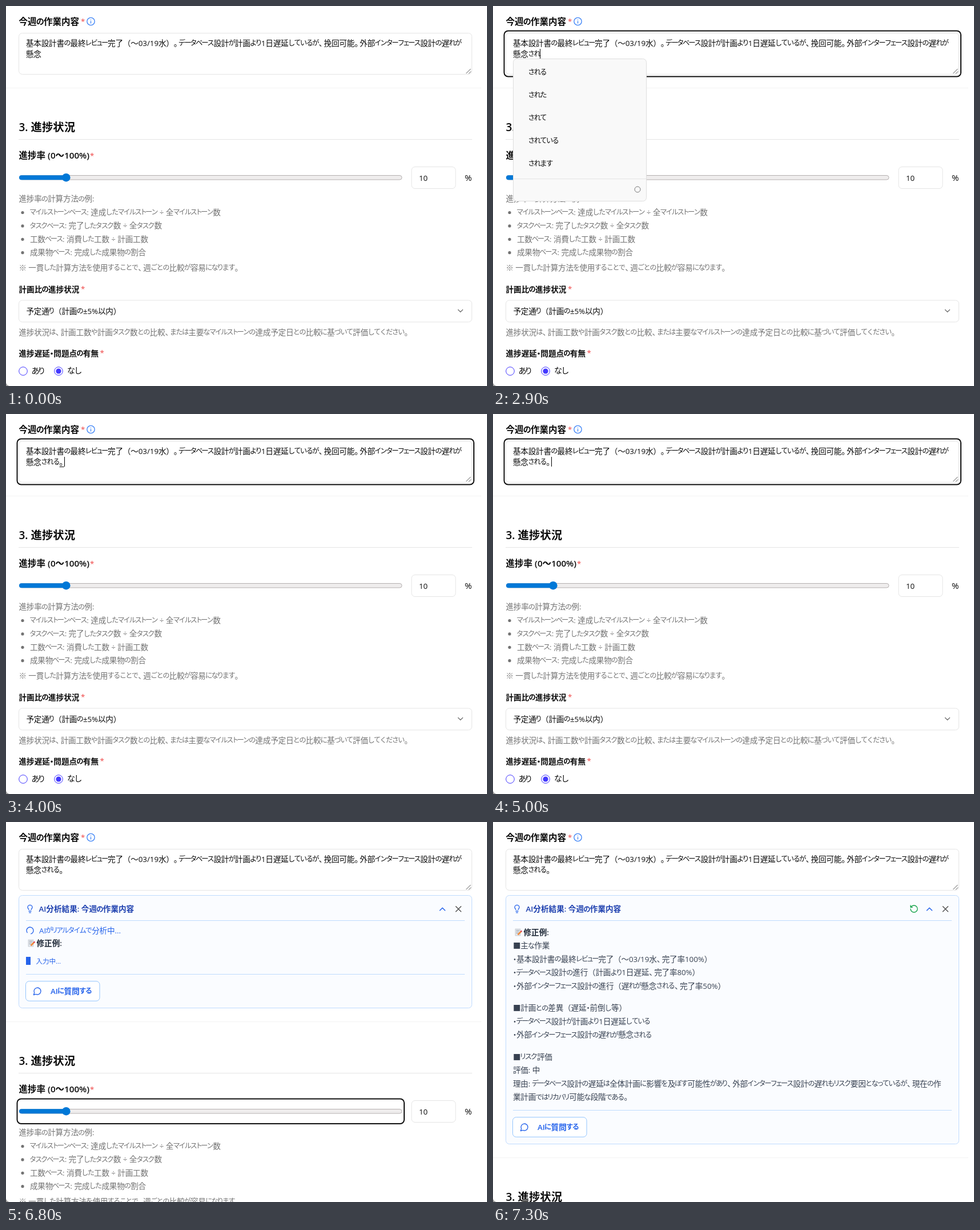
These frames come from a looping animation (842x665 px, 8 s). An HTML page:

```html
<!DOCTYPE html>
<html lang="ja">
<head>
<meta charset="utf-8">
<title>週報フォーム</title>
<style>
  html, body { margin: 0; width: 100%; height: 100%; overflow: hidden; background: #fff; }
  svg { display: block; width: 842px; height: 665px; }
  text { white-space: pre; font-family: "Open Sans", "Noto Sans CJK JP", sans-serif; }
  .cjk { font-family: "Noto Sans CJK JP", sans-serif; }
</style>
</head>
<body>
<svg id="stage" viewBox="0 0 842 665" lang="ja"></svg>
<script>
const LOOP = 8000, STEP = 100;
const INK = '#0a0a0a', GRAY = '#737373', BODY = '#374151', EDGE = '#e5e5e5';
const BLUE = '#2563eb', NAVY = '#1e40af', PALE = '#bfdbfe';
const stage = document.getElementById('stage');
const meter = document.createElement('canvas').getContext('2d');

// ---------- text: compact kana, near-full kanji ----------
const LATIN = 0.95, KANJI = 0.97, KANA = 0.88;
const kind = c => /[\x20-\x7e÷±]/.test(c) ? 'latin' : /[\u3041-\u30ff]/.test(c) && c !== '・' ? 'kana' : 'kanji';

function advance(c) {
  if (/[、。]/.test(c)) return 0.65;
  if (c === '・') return 0.45;
  if (/[トェュィっりリ]/.test(c)) return 0.6;
  if (/[\u30a1-\u30ff]/.test(c)) return 0.722;
  if (/[\u3041-\u309f]/.test(c)) return 0.757;
  return 0.957;
}

function layout(str, x, y, size, weight) {
  const runs = str.match(/[\x20-\x7e÷±]+|[\u3041-\u30fa\u30fc-\u30ff]+|[^\x20-\x7e÷±\u3041-\u30fa\u30fc-\u30ff]+/g) || [];
  const wide = weight > 500 ? 1.015 : 1;
  let pen = x, out = '';
  for (const run of runs) {
    const type = kind(run[0]);
    if (type === 'latin') {
      const px = size * LATIN;
      meter.font = `${weight} ${px}px "Open Sans", sans-serif`;
      out += `<tspan x="${pen.toFixed(2)}" y="${y}" font-size="${px}">${run}</tspan>`;
      pen += meter.measureText(run).width;
      continue;
    }
    const scale = type === 'kana' ? KANA : KANJI, xs = [];
    for (const c of run) {
      const a = advance(c) * wide;
      xs.push((pen + (/[、。]/.test(c) ? 0 : (a - scale) / 2 * size)).toFixed(2));
      pen += a * size;
    }
    const lift = type === 'kana' ? size * 0.04 : 0;
    out += `<tspan class="cjk" x="${xs.join(' ')}" y="${y - lift}" font-size="${size * scale}">${run}</tspan>`;
  }
  return { out, end: pen };
}

const text = (str, x, y, fill = INK, size = 14, weight = 400) =>
  `<text fill="${fill}" font-weight="${weight}">${layout(str, x, y, size, weight).out}</text>`;
const bold = (str, x, y, fill = INK, size = 14) => text(str, x, y, fill, size, 600);
const star = (x, y) => text('*', x, y, '#ef4444', 14);

// ---------- shapes ----------
const box = (x, y, w, h, stroke = EDGE, fill = '#fff', r = 6, sw = 1) =>
  `<rect x="${x}" y="${y}" width="${w}" height="${h}" rx="${r}" fill="${fill}" stroke="${stroke}" stroke-width="${sw}"/>`;
const rule = (x1, x2, y, stroke = EDGE) => `<path d="M${x1} ${y}H${x2}" stroke="${stroke}"/>`;
const disc = (x, y, r, fill, extra = '') => `<circle cx="${x}" cy="${y}" r="${r}" fill="${fill}" ${extra}/>`;
const focusRing = (x, y, w, h) => box(x, y, w, h, '#111', 'none', 7, 2);

const ICON = {
  bulb: 'M15 14c.2-1 .7-1.7 1.5-2.5 1-.9 1.5-2.2 1.5-3.5A6 6 0 0 0 6 8c0 1 .2 2.2 1.5 3.5.7.7 1.3 1.5 1.5 2.5M9 18h6M10 22h4',
  redo: 'M3 12a9 9 0 1 0 9-9 9.75 9.75 0 0 0-6.74 2.74L3 8M3 3v5h5',
  chat: 'M7.9 20A9 9 0 1 0 4 16.1L2 22Z',
  up: 'm18 15-6-6-6 6',
  down: 'm6 9 6 6 6-6',
  close: 'M18 6 6 18M6 6l12 12',
  info: 'M2 12a10 10 0 1 0 20 0a10 10 0 1 0-20 0M12 16.5v-5M12 8v-.4',
  spin: 'M21 12a9 9 0 1 1-6.22-8.56'
};
const icon = (name, cx, cy, color, size = 16, turn = 0) =>
  `<path transform="translate(${cx} ${cy}) rotate(${turn}) scale(${size / 24}) translate(-12 -12)" d="${ICON[name]}" fill="none" stroke="${color}" stroke-width="2" stroke-linecap="round" stroke-linejoin="round"/>`;

const memo = (x, y) => `<g transform="translate(${x} ${y})">
  <path d="M0-6H9V6H0Z" fill="#e3e6ea" stroke="#b8bec6" stroke-width=".6"/>
  <path d="M1.5-3.5h6M1.5-1h5M1.5 1.5h3" stroke="#8b95a3" stroke-width=".8"/>
  <path d="M4.5 4.2 10-1.2" stroke="#f08a3c" stroke-width="2.6"/>
  <path d="M9.6-.8 11.4-2.6" stroke="#d9485f" stroke-width="2.6"/></g>`;

// ---------- form ----------
const LINE = '基本設計書の最終レビュー完了（～03/19水）。データベース設計が計画より1日遅延しているが、挽回可能。外部インターフェース設計の遅れが';

// [time, second line of the text area]
const TYPED = [[0, '懸念'], [2300, '懸念さ'], [2700, '懸念さr'], [2900, '懸念され'], [3200, '懸念されr'], [3300, '懸念される'], [3900, '懸念される。']];
const typedAt = t => TYPED.filter(([at]) => at <= t).pop()[1];
const caretOn = t => !(t >= 1100 && t < 1700) && !(t >= 4500 && t < 5000);

function workField(t) {
  const line = typedAt(t), focus = t >= 600 && t < 5500;
  const end = layout(line, 35, 89, 14, 400).end;
  let s = bold('今週の作業内容', 22.5, 32.5, INK, 16) + star(131, 32) + icon('info', 148.5, 27, '#3b82f6');
  s += box(22.5, 47.5, 793, 72) + '<path d="M805.5 118 813.5 110M810 118.5 814 114.5" stroke="#555"/>';
  if (focus) s += focusRing(19.5, 43.5, 799.5, 80);
  s += text(LINE, 35, 70) + text(line, 35, 89);
  const from = t >= 2300 && t < 3600 ? '懸念' : t >= 3900 && t < 4100 ? '懸念される' : '';
  if (from) s += rule(layout(from, 35, 89, 14, 400).end, end - 1, 92.5, INK);
  if (focus && caretOn(t)) s += `<path d="M${Math.round(end) - 0.5} 75V92" stroke="#000"/>`;
  return s;
}

const METHODS = [
  'マイルストーンベース: 達成したマイルストーン ÷ 全マイルストーン数',
  'タスクベース: 完了したタスク数 ÷ 全タスク数',
  '工数ベース: 消費した工数 ÷ 計画工数',
  '成果物ベース: 完成した成果物の割合'
];

const slider = box(23.5, 296.5, 669.5, 7.5, '#b5b0b0', '#efeded', 4) +
  '<path d="M27 300.2H105" stroke="#0078d7" stroke-width="8" stroke-linecap="round"/>' + disc(105.3, 300.2, 7.3, '#0078d7');

const progress = rule(0, 832, 143.5, '#f3f3f3') +
  bold('3. 進捗状況', 22.5, 219, INK, 20) + rule(22, 816, 233.5) +
  bold('進捗率 (0～100%)', 22.5, 267.3, INK, 16) + star(147, 267) + slider +
  box(710, 281.5, 77, 38) + text('10', 723, 306) + text('%', 803, 306, INK, 16) +
  text('進捗率の計算方法の例:', 22.5, 342.3, GRAY) +
  METHODS.map((m, i) => disc(29, 361.5 + i * 23.4, 2.6, GRAY) + text(m, 42, 365.8 + i * 23.4, GRAY)).join('') +
  text('※ 一貫した計算方法を使用することで、週ごとの比較が容易になります。', 22.5, 462.5, GRAY) +
  bold('計画比の進捗状況', 22.5, 500.8) + star(131, 500) +
  box(22.5, 515, 793, 38) + text('予定通り（計画の±5%以内）', 35.5, 538.8) + icon('down', 795.5, 533.5, GRAY) +
  text('進捗状況は、計画工数や計画タスク数との比較、または主要なマイルストーンの達成予定日との比較に基づいて評価してください。', 22.5, 576, GRAY) +
  bold('進捗遅延・問題点の有無', 22.5, 613) + star(164.5, 612) +
  disc(30, 639, 7.3, '#fff', 'stroke="#4338ff"') + text('あり', 45.5, 644, INK, 16) +
  disc(92, 639, 7.3, '#fff', 'stroke="#4338ff"') + disc(92, 639, 4.6, '#4338ff') + text('なし', 108, 644, INK, 16);

// ---------- input suggestions ----------
const WORDS = {
  first: ['さ', '作業', '最終', '再', '際に'],
  rest: ['される', 'された', 'されて', 'されている', 'されます'],
  stop: ['。', '、', '・', '「', '」']
};

function popup(t) {
  let x, right, words;
  if (t >= 2400 && t < 3600) {
    x = 35;
    right = t >= 2900 && t < 3200 ? 269 : 233;
    words = t < 2700 ? WORDS.first : WORDS.rest;
  } else if (t >= 3900 && t < 4000) {
    x = 66; right = 247; words = WORDS.stop;
  } else return '';
  return box(x + 0.5, 92.5, right - x - 1, 249, '#dedede', '#f9f9f9') +
    words.map((w, i) => text(w, x + 27, 121 + i * 40)).join('') +
    rule(x + 1, right - 1, 302.5) + disc(right - 16, 321, 5, 'none', 'stroke="#777"');
}

// ---------- analysis panel ----------
const REPORT = [
  ['■主な作業', '・基本設計書の最終レビュー完了（～03/19水、完了率100%）', '・データベース設計の進行（計画より1日遅延、完了率80%）', '・外部インターフェース設計の進行（遅れが懸念される、完了率50%）'],
  ['■計画との差異（遅延・前倒し等）', '・データベース設計が計画より1日遅延している', '・外部インターフェース設計の遅れが懸念される'],
  ['■リスク評価', '評価: 中', '理由: データベース設計の遅延は全体計画に影響を及ぼす可能性があり、外部インターフェース設計の遅れもリスク要因となっているが、現在の作', '業計画ではリカバリ可能な段階である。']
];
const TOTAL = REPORT.flat().join('').length;

function report(top, count) {
  let s = memo(39, top - 5) + bold('修正例:', 53.5, top, '#1f2937');
  let y = top, last = top;
  REPORT.forEach((part, p) => part.forEach((line, i) => {
    y += p && !i ? 38.8 : 23.4;
    if (count <= 0) return;
    s += text(line.slice(0, Math.ceil(count)), 35, +y.toFixed(1), BODY);
    count -= line.length;
    last = y;
  }));
  return { s, last };
}

const askButton = y => rule(35, 803, y - 29.5, PALE) + box(34.5, y - 17.3, 129.5, 34.5, '#93c5fd') +
  icon('chat', 55, y, BLUE) + bold('AIに質問する', 78, y + 5, BLUE);

function panel(t) {
  if (t < 5500) return { s: '', shift: 0 };
  const done = t >= 7300;
  let s = '', bottom = 212;
  if (t < 6400) {
    s = icon('spin', 42, 190, BLUE, 16, (t - 5600) * 0.36) + text('AI分析中...', 58, 195, BLUE);
  } else {
    const typed = done ? TOTAL : TOTAL * Math.max(0, Math.min(1, (t - 6800) / 400));
    const { s: body, last } = report(done ? 198 : 217, typed);
    s = body;
    if (!done) {
      s += icon('spin', 42, 190, BLUE, 16, (t - 6400) * 0.36) + text('AIがリアルタイムで分析中...', 58, 195, BLUE) +
        `<rect x="35" y="${last + 19}" width="8" height="14" fill="${BLUE}"/>` + text('入力中...', 52.5, last + 30.5, BLUE, 12);
    }
    const y = last + (done ? 47.8 : 79);
    s += askButton(y);
    bottom = y + 29.5;
  }
  const head = box(22.5, 128.5, 793, bottom - 128.5, PALE, '#fafcff') +
    icon('bulb', 42, 152, BLUE) + bold('AI分析結果: 今週の作業内容', 57.5, 157.3, NAVY) +
    (done ? icon('redo', 737, 152, '#16a34a') : '') +
    icon('up', 764, 152.5, BLUE, 18) + icon('close', 792, 152.3, '#555', 18) + rule(35, 803, 172.5, PALE);
  return { s: head + s, shift: Math.round(bottom - 119.7) };
}

const corner = '<path d="M0 659Q1 664 6 665H0Z" fill="#9a9a9a"/>';

function draw(t) {
  const p = panel(t);
  const ring = t >= 5500 ? focusRing(19.5, 278.5, 677.5, 43.5) : '';
  stage.innerHTML = workField(t) + `<g transform="translate(0 ${p.shift})">${progress}${ring}</g>` + p.s + popup(t) + corner;
}

let shown = -1;
function tick(now) {
  const step = Math.floor(now % LOOP / STEP);
  if (step !== shown) {
    shown = step;
    draw(step * STEP);
  }
  requestAnimationFrame(tick);
}
draw(0);
requestAnimationFrame(tick);
</script>
</body>
</html>
```
